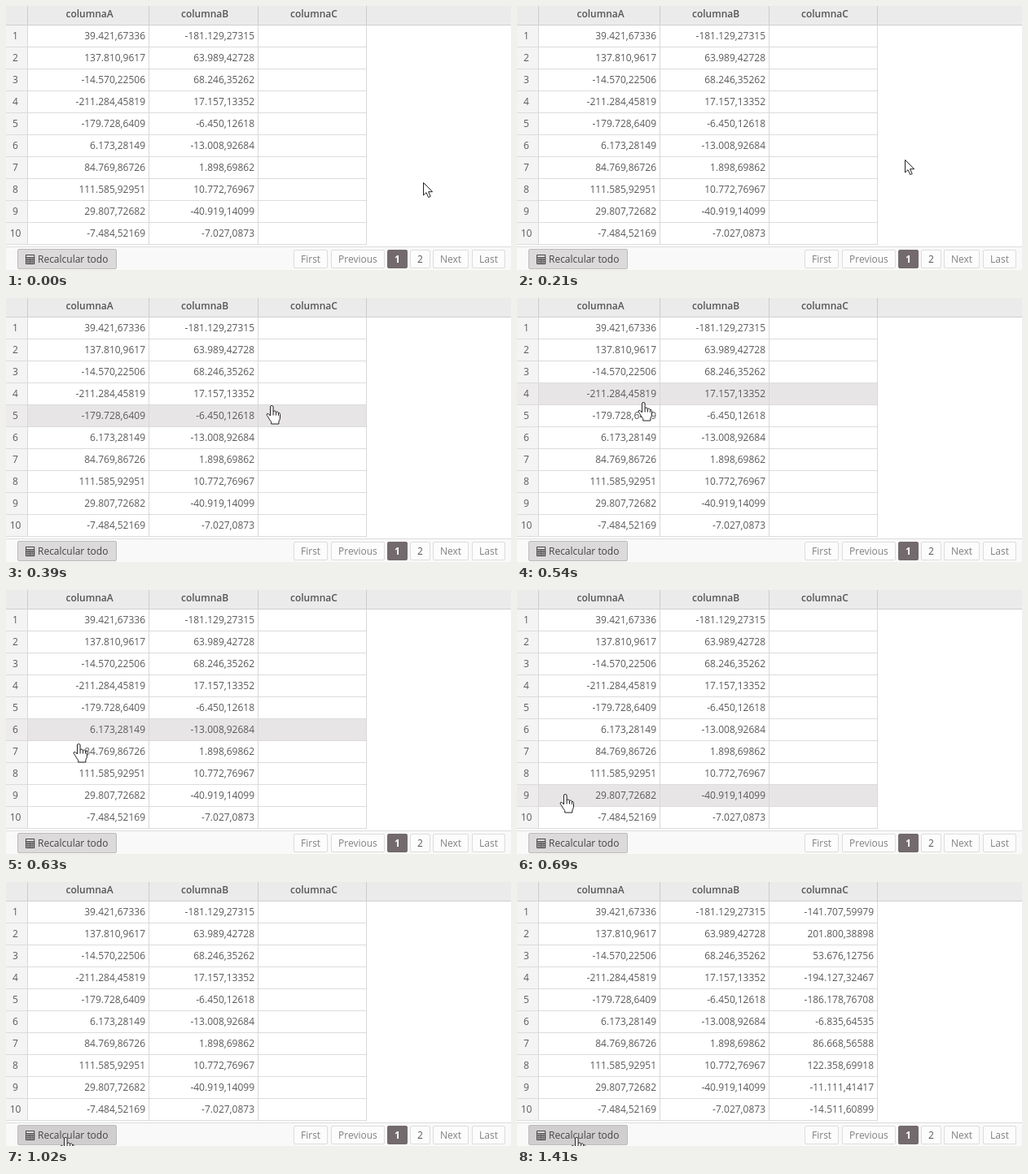
An HTML page for the animation above (2.16 s loop, 620 px wide and 325 px high).

```html
<!DOCTYPE html>
<html lang="es">
<head>
<meta charset="utf-8">
<title>Recalcular todo</title>
<style>
  html, body { margin: 0; width: 100%; height: 100%; overflow: hidden; background: #fff; }
  svg { display: block; width: 620px; height: 325px; }
  text { font: 12px "Open Sans", sans-serif; fill: #5a5a5a; white-space: pre; }
  .head { font-weight: 600; fill: #555; }
  .num { text-anchor: end; }
  .mid { text-anchor: middle; }
  .dark { fill: #444; }
  .page { fill: #808080; }
  .current { fill: #fff; font-weight: 700; }
</style>
</head>
<body>
<svg id="stage" viewBox="0 0 620 325"></svg>
<script>
const LOOP = 2160, STEP = 30, PRESS = 1320, RESULT = 1410;
const TOP = 24, ROW = 27, LAG = 12;
const stage = document.getElementById('stage');

// The two given columns; the third is their sum
const data = [
  [39421.67336, -181129.27315], [137810.9617, 63989.42728],
  [-14570.22506, 68246.35262], [-211284.45819, 17157.13352],
  [-179728.6409, -6450.12618], [6173.28149, -13008.92684],
  [84769.86726, 1898.69862], [111585.92951, 10772.76967],
  [29807.72682, -40919.14099], [-7484.52169, -7027.0873]
];

// Pointer keys: time, x, y
const path = [
  [30, 512, 217], [300, 432, 167], [420, 288, 125], [540, 156, 129],
  [630, 90, 190], [690, 60, 252], [810, 57, 299], [1020, 74, 315]
];

function add(tag, attrs, parent = stage, content) {
  const el = document.createElementNS('http://www.w3.org/2000/svg', tag);
  for (const k in attrs) el.setAttribute(k, attrs[k]);
  if (content !== undefined) el.textContent = content;
  parent.appendChild(el);
  return el;
}
const box = (x, y, width, height, fill, parent) => add('rect', { x, y, width, height, fill }, parent);
const label = (x, y, s, cls = '', parent) => add('text', { x, y, class: cls }, parent, s);
const button = (x, y, width, height, fill, stroke) =>
  add('rect', { x: x + .5, y: y + .5, width: width - 1, height: height - 1, rx: 1.5, fill, stroke });

function format(n) {
  const [whole, frac] = n.toFixed(5).replace(/0+$/, '').split('.');
  return whole.replace(/\B(?=(\d{3})+$)/g, '.') + ',' + frac;
}

// Table
box(0, 0, 620, 23, '#ebebeb');
box(0, TOP, 26, 270, '#f4f4f4');
const hover = add('g', {});
box(0, 0, 26, 26, '#edebec', hover);
box(27, 0, 415, 26, '#e8e5e6', hover);
box(0, 23, 620, 1, '#d0d0d0');
for (let i = 1; i <= 10; i++) box(0, TOP + i * ROW - 1, 443, 1, '#dcdcdc');
for (const x of [26, 175, 309, 442]) {
  box(x, 0, 1, 23, '#cccccc');
  box(x, TOP, 1, 270, '#d8d8d8');
}
label(73.5, 14, 'columnaA', 'head');
label(215, 14, 'columnaB', 'head');
label(349, 14, 'columnaC', 'head');

const result = add('g', {});
data.forEach(([a, b], i) => {
  const y = TOP + 17 + i * ROW;
  label(11.5, y, i + 1, 'mid');
  label(171, y, format(a), 'num');
  label(305, y, format(b), 'num');
  label(438, y, format(a + b), 'num', result);
});

// Footer
box(0, 296, 620, 29, '#f9f9f9');
box(0, 296, 620, 1, '#dddddd');
const recalc = button(14, 299, 122, 25, '#dcdada', '#bdbaba');
const icon = add('g', { transform: 'translate(24 306)' });
add('rect', { width: 11.2, height: 12, rx: .8, fill: '#444' }, icon);
box(1, 1, 9.2, 2.2, '#dcdada', icon);
for (let k = 0; k < 12; k++)
  box(1 + k % 4 * 2.5, 4.4 + Math.floor(k / 4) * 2.5, 1.5, 1.5, '#dcdada', icon);
label(39, 316, 'Recalcular todo', 'dark');

// Each page button is as wide as its text plus padding
let left = 353;
for (const s of ['First', 'Previous', '1', '2', 'Next', 'Last']) {
  const on = s === '1';
  const r = button(left, 300, 25, 23, on ? '#736a6d' : '#fcfcfc', on ? '#736a6d' : '#dddddd');
  const t = label(left + 9, 316, s, on ? 'current' : s === '2' ? '' : 'page');
  const w = t.getComputedTextLength() + 18;
  r.setAttribute('width', Math.round(w) - 1);
  left = Math.round(left + w + 3.6);
}

// Pointers, with the hot spot at 0,0
const arrow = add('path', {
  d: 'M.5 .5V16L4 12.7 6.7 18.6 9.2 17.5 6.6 11.7H11.6Z',
  fill: '#fff', stroke: '#222'
});
const hand = add('g', { stroke: '#222', fill: 'none', 'stroke-linejoin': 'round' });
add('path', {
  fill: '#fff',
  d: 'M-2.5 1Q-2.5-.5-.7-.5Q1.1-.5 1.1 1V7Q1.5 5.8 2.9 6Q4.5 6.2 4.5 7.8Q5.1 6.8 6.5 7.2Q7.5 7.6 7.5 9' +
     'Q8.1 8 8.9 8.6Q9.5 9 9.5 10.5V14Q9.5 17 7.9 19V22H-1.3V19.5Q-3.5 17-5.1 13.8Q-7.3 11-6.9 10' +
     'Q-6 8.6-4.3 10L-2.5 12Z'
}, hand);
add('path', { d: 'M1.1 7V11.5M4.5 7.8V11.5M7.5 9V11.8M-2.5 7V12' }, hand);

// Tangents follow the neighbours and vanish at both ends
function slope(i, k) {
  const a = path[i - 1], b = path[i + 1];
  return a && b ? (b[k] - a[k]) / (b[0] - a[0]) : 0;
}

function pointer(t) {
  const first = path[0], last = path[path.length - 1];
  if (t <= first[0]) return first.slice(1);
  if (t >= last[0]) return last.slice(1);
  const i = path.findIndex(p => p[0] > t) - 1;
  const p = path[i], q = path[i + 1], d = q[0] - p[0], u = (t - p[0]) / d;
  const u2 = u * u, u3 = u2 * u;
  return [1, 2].map(k =>
    p[k] * (2 * u3 - 3 * u2 + 1) + q[k] * (3 * u2 - 2 * u3) +
    d * (slope(i, k) * (u3 - 2 * u2 + u) + slope(i + 1, k) * (u3 - u2)));
}

const show = (el, on) => el.setAttribute('visibility', on ? 'visible' : 'hidden');

function draw(time) {
  const t = Math.floor(time % LOOP / STEP) * STEP;
  const pos = pointer(t).map(Math.round);
  const [hx, hy] = pointer(t - LAG);
  const row = Math.floor((hy - TOP) / ROW);
  const inside = hx < 442;

  show(hover, inside && row < 10);
  hover.setAttribute('transform', `translate(0 ${TOP + row * ROW})`);
  show(arrow, !inside);
  show(hand, inside);
  for (const el of [arrow, hand]) el.setAttribute('transform', `translate(${pos})`);

  const pressed = t >= PRESS && t < RESULT;
  recalc.setAttribute('fill', pressed ? '#c6c3c4' : hy >= 300 ? '#d1cecf' : '#dcdada');
  show(result, t >= RESULT);
}

const start = performance.now();
function tick() {
  draw(performance.now() - start);
  requestAnimationFrame(tick);
}
tick();
</script>
</body>
</html>
```
